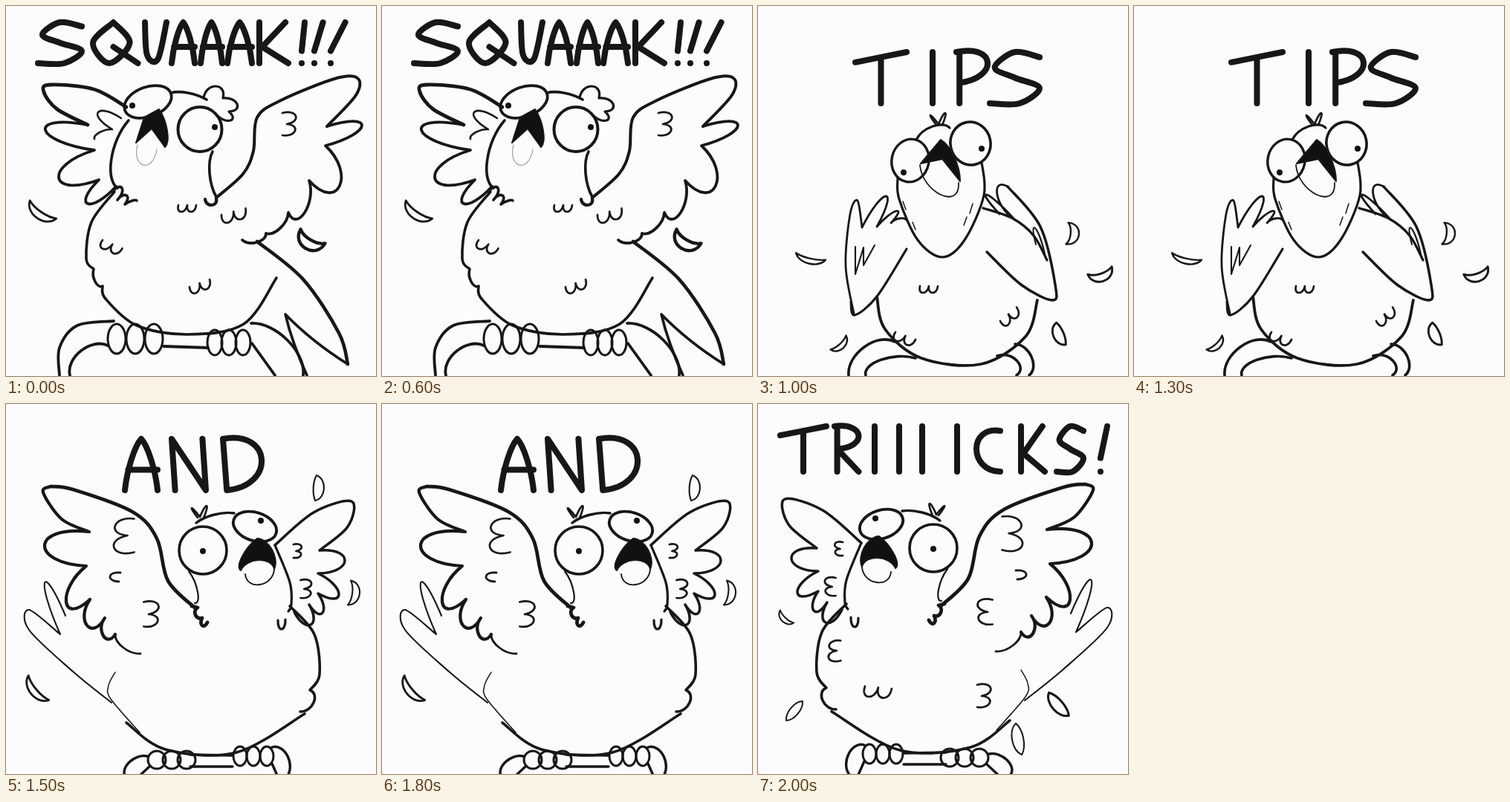
An HTML page for the animation above (2.5 s loop, 498x498 px).

```html
<!DOCTYPE html>
<html lang="en">
<head>
<meta charset="utf-8">
<title>Squawking parrot</title>
<style>
  html, body { margin: 0; width: 100%; height: 100%; overflow: hidden; background: #fcfbfe; }
  svg { display: block; width: 100vw; height: 100vh; }
  path, ellipse { fill: none; stroke: #171717; stroke-linecap: round; stroke-linejoin: round; }
  .ink { fill: #111; }
  .faint { stroke: #aaa9ad; }
</style>
</head>
<body>
<svg id="stage" viewBox="0 0 498 498"></svg>
<script>
const LOOP = 2500;
const stage = document.getElementById('stage');

// Lettering strokes in a box of 10 by 10
const glyphs = {
  A: '0 10 2 4 5 0/8 4 10 10;1 6 10 6',
  C: '10 1 0 5 10 10',
  D: '1 10 0 0/10 4 1 10',
  I: '0 0 0 10',
  K: '0 0 0 10;9 0 1 6/10 10',
  N: '1 10 0 0/10 10/9 0',
  P: '1 0 1 10;0 0/10 2 1 6',
  Q: '5 0 0 5 4 10 9 5 5 0;5 6 11 10',
  R: '1 0 1 10;0 0/9 2 1 5/9 10',
  S: '10 1 5 0 1 3 5 5 10 7 6 10 0 10',
  T: '0 2 10 0;5 1 5 10',
  U: '0 0 1 8 6 9 10 0',
  '!': '2 0 0 7;0 10 0 10',
};

function add(parent, tag, attrs) {
  const node = document.createElementNS('http://www.w3.org/2000/svg', tag);
  for (const key in attrs) node.setAttribute(key, attrs[key]);
  return parent.appendChild(node);
}

function points(text) {
  const n = text.split(' ').map(Number);
  return n.filter((_, i) => i % 2 === 0).map((x, i) => [x, n[2 * i + 1]]);
}

const cubic = (p, q, end) => `C${p} ${q} ${end}`;

// Round arch from a over its crown t to b
function arch(a, t, b) {
  const chord = Math.hypot(b[0] - a[0], b[1] - a[1]) || 1;
  const rise = Math.hypot(t[0] - (a[0] + b[0]) / 2, t[1] - (a[1] + b[1]) / 2) / chord;
  const spread = Math.min(1.1, (1 + 4 * rise) / 3) / 2;
  const handle = s => t.map((v, k) => (8 * v - a[k] - b[k]) / 6 + s * spread * (a[k] - b[k]));
  return cubic(handle(1), handle(-1), b);
}

function spline(pts) {
  return pts.slice(1).map((c, i) => {
    const b = pts[i], a = pts[i - 1] || b, e = pts[i + 2] || c;
    return cubic(b.map((v, k) => v + (c[k] - a[k]) / 6), c.map((v, k) => v - (e[k] - b[k]) / 6), c);
  }).join('');
}

// ";" parts strokes, "/" marks a corner; a piece of three points is an arch
function trace(text, place = p => p) {
  return text.split(';').map(stroke => {
    let d = '', end;
    for (const piece of stroke.split('/')) {
      const pts = points(piece).map(place);
      if (end) pts.unshift(end);
      else d = 'M' + pts[0];
      d += pts.length === 3 ? arch(...pts) : spline(pts);
      end = pts[pts.length - 1];
    }
    return d;
  }).join('');
}

const placed = (x, y, angle, size) => ([u, v]) => {
  const r = angle * Math.PI / 180, c = Math.cos(r) * size, s = Math.sin(r) * size;
  return [x + u * c - v * s, y + u * s + v * c];
};

function pen(group) {
  const stroke = (width, d, cls = '') => add(group, 'path', { d, 'stroke-width': width, class: cls });
  const oval = (width, cx, cy, rx, ry, turn = 0) => add(group, 'ellipse',
    { cx, cy, rx, ry, 'stroke-width': width, transform: `rotate(${turn} ${cx} ${cy})` });
  const motif = shape => (x, y, angle = 0, size = 1) =>
    stroke(2.7, trace(shape, placed(x, y, angle, size)));
  return {
    oval,
    line: (width, text, cls) => stroke(width, trace(text), cls),
    shape: text => stroke(2, trace(text) + 'Z', 'ink'),
    dot: (cx, cy) => add(group, 'ellipse', { cx, cy, rx: 4, ry: 4, 'stroke-width': 0, class: 'ink' }),
    down: motif('0 0/4 9 12 0/17 9 24 0'),
    curl: motif('-7 -15/11 -11 -1 0/10 9 -7 15'),
    sprout: motif('-3 0/-11 -13 0 -1/9 -16 5 0'),
    feather(width, x, y, angle, length, depth, inner = 0.3) {
      const h = length / 2;
      const leaf = `${-h} 0/0 ${depth} ${h} 0/0 ${depth * inner} ${-h} 0`;
      stroke(width, trace(leaf, placed(x, y, angle, 1)));
    },
    toes(x, y, step, rx, ry) {
      for (let i = 0; i < 3; i++) oval(3, x + i * step, y, rx, ry);
    },
    // spans: left edge and width of each letter
    write(word, top, bottom, spans) {
      const boxes = points(spans);
      [...word].forEach((ch, i) => {
        const [x, w] = boxes[i];
        stroke(8, trace(glyphs[ch], ([u, v]) => [x + u * w / 10, top + v * (bottom - top) / 10]));
      });
    },
  };
}

function squawk(p) {
  p.line(4.8, '162 136 118 112 59 106 51 116 69 139 110 160');
  p.line(3.8, '110 160/53 167 119 194/71 231 125 234/110 266 148 243');
  p.line(2.6, '155 151/124 143 143 166/126 170 119 179');
  p.line(4, '283 258 319 226 333 195 338 150 370 127 442 98 473 97 471 120 432 162');
  p.line(3.8, '432 162/479 161 430 188/449 242 408 235/402 278 380 278/369 299 350 306/338 318 318 315');
  p.curl(379, 159);
  p.oval(3.8, 191, 129, 33, 20, -20);
  p.oval(4, 261, 166, 29.5, 30);
  p.dot(281, 163);
  p.dot(170, 134);
  p.line(3.6, '165 154 142 205 150 245;222 117 245 117 270 126;278 196 274 225 283 257');
  p.line(3.2, '266 124/282 108 292 124/311 132 300 142/302 154 284 147');
  p.shape('175 184 186 150/206 139/217 168 214 190/196 165/175 184');
  p.line(1.4, '177 187/185 214 203 193', 'faint');
  p.line(4.2, '268 260/277 268 283 259');
  p.line(3.6, '143 250/156 245 150 261/162 255 160 267/170 262 176 262');
  p.line(3.6, '146 250 115 291 108 340 118 354/120 371 130 377/134 394 176 430 245 442 320 428 364 366');
  p.down(232, 268);
  p.down(290, 281, -15, 1.4);
  p.down(130, 315, 23, 1.2);
  p.down(247, 378, -20, 1.2);
  p.line(4.6, '338 317 400 368 448 440 460 482');
  p.line(3.6, '460 482 415 450 376 415/388 455 405 497');
  p.line(3.8, '72 497 72 460 96 430 145 424;86 497 101 464 137 457;212 458 272 460;330 427 379 450 400 497;331 454 362 497');
  p.toes(149, 448, 25, 12, 20);
  p.toes(281, 453, 19, 10, 17);
  p.feather(2.8, 50, 274, 34, 43, 14);
  p.feather(4.4, 413, 310, 30, 38, 19);
}

function flap(p) {
  p.sprout(243, 160);
  p.line(3.2, '213 180 235 162 258 164');
  p.oval(3.4, 205, 208, 25, 29, 12);
  p.oval(3.6, 286, 185, 27, 29, -12);
  p.dot(196, 224);
  p.dot(301, 192);
  p.shape('219 212 246 180/264 203 272 236/248 206/219 212');
  p.line(1.8, '218 214/246 254 270 238');
  p.line(3.2, '188 231 190 260 215 315 248 338 278 315 304 255 301 210');
  p.line(1.5, '195 263 199 274;208 291 212 301;289 266 285 279;281 284 277 295');
  p.line(2.8, '129 414 118 350 124 280 134 262 140 298/172 256 160 297/186 276 179 292/190 286 200 288');
  p.line(3.2, '125 398 130 416 160 391 200 327');
  p.line(2.1, '131 324 131 361/142 325/142 349/157 322');
  p.line(3.5, '308 331 354 375 396 396 400 375 380 297 336 243');
  p.line(2.8, '336 243/322 254 344 286/308 254 325 280');
  p.line(3.4, '303 272 343 286 371 309 389 342');
  p.line(2, '374 321/373 299 386 333');
  p.line(3.8, '160 391 171 435 220 474 300 482 360 445 376 396');
  p.down(218, 377);
  p.down(326, 424, -40, 1.2);
  p.down(185, 439, 20, 1.2);
  p.line(3.6, '122 497 143 459 184 452;346 455 368 472 365 497;145 497 166 476 212 474;322 471 348 477 348 497');
  p.feather(2.4, 71, 337, 13, 41, 10);
  p.feather(2.4, 108, 453, -42, 28, 10);
  p.feather(2.4, 416, 306, -84, 29, 16);
  p.feather(2.9, 460, 356, -18, 34, 15);
  p.feather(2.9, 408, 441, 67, 32, 11, -0.3);
}

// The pose shared by both sideways squawks
function sway(p) {
  p.line(4.7, '255 275 218 238 203 181 170 145 90 115 60 111');
  p.line(4.2, '60 111 50 119 75 155 112 172/52 190 108 218/81 266 113 263/109 298 133 288/131 312 147 310');
  p.line(2.8, '147 310/158 328 181 336;154 227/140 232 152 239');
  p.line(4.8, '250 272 258 274/255 284 264 288/264 298 271 294');
  p.curl(162, 177, 180, 1.5);
  p.curl(193, 283, 0, 1.1);
  p.line(2.1, '73 310/52 241 80 285;73 310 31 277 31 304 90 360 142 402');
  p.line(1.5, '147 361 138 379 141 397 180 442');
  p.line(3.4, '256 160 280 149 307 147');
  p.sprout(261, 153);
  p.oval(3.6, 265, 197, 32, 32);
  p.dot(265, 198);
  p.oval(3.9, 335, 165, 30, 19, 18);
  p.dot(343, 157);
  p.shape('316 224 318 205 338 181/358 196 361 222/340 210 316 224');
  p.line(1.9, '322 229/342 243 361 222');
  p.line(3.2, '362 190 382 240 384 270 380 279;366 291/371 303 376 290');
  p.line(2.2, '246 225 258 253 254 268');
  p.line(3.5, '362 190 414 146 465 131 460 165 422 197/456 211 420 228/448 256 420 255/426 281 408 270/410 297 388 280');
  p.curl(391, 198, 0, 0.6);
  p.curl(402, 249, 0, 0.8);
  p.line(3.6, '382 272 415 310 422 364 409 385/414 402 396 414');
  p.line(3.6, '162 429 215 465 310 469 402 417');
  p.line(3.4, '161 502 166 482 190 474;248 472 305 473;248 488 305 488;358 462 379 474 378 502;178 502 193 488;358 484 366 502');
  p.toes(203, 479, 20, 12, 12);
  p.toes(315, 474, 18, 9, 13);
}

const poses = [
  { start: 0, word: 'SQUAAAK!!!', draw(p) {
    p.write(this.word, 22, 77, '43 59 117 55 187 29 223 31 262 29 298 33 341 39 398 20 415 58 437 98');
    squawk(p);
  } },
  { start: 1000, word: 'TIPS', draw(p) {
    p.write(this.word, 62, 131, '131 69 235 1 267 42 312 67');
    flap(p);
  } },
  { start: 1500, word: 'AND', draw(p) {
    p.write(this.word, 47, 116, '160 44 223 46 292 52');
    sway(p);
    p.feather(2.1, 417, 113, -87, 34, 11, -0.3);
    p.feather(2.1, 462, 254, -83, 33, 14);
    p.feather(2.8, 44, 382, 50, 43, 13);
  } },
  { start: 2000, word: 'TRIIIICKS!', draw(p, group) {
    p.write(this.word, 30, 91, '30 62 103 36 157 1 190 1 221 1 268 1 294 32 354 32 402 36 461 45');
    sway(pen(add(group, 'g', { transform: 'translate(501 -3) scale(-1 1)' })));
    p.curl(105, 332, 180, 0.9);
    p.curl(302, 393);
    p.down(144, 380, 5, 1.5);
    p.feather(2, 39, 286, 43, 25, 9);
    p.feather(2, 49, 413, -50, 34, 6, -1);
    p.feather(3, 405, 404, 49, 41, 10, -0.5);
    p.feather(2, 351, 451, 79, 43, 9, -0.7);
  } },
];

const groups = poses.map(pose => {
  const group = add(stage, 'g', { role: 'img', 'aria-label': pose.word });
  pose.draw(pen(group), group);
  return group;
});

const origin = performance.now();
function show(now) {
  const t = Math.max(0, now - origin) % LOOP;
  const current = poses.filter(pose => pose.start <= t).length - 1;
  groups.forEach((g, i) => { g.style.display = i === current ? '' : 'none'; });
  requestAnimationFrame(show);
}
show(origin);
</script>
</body>
</html>
```
